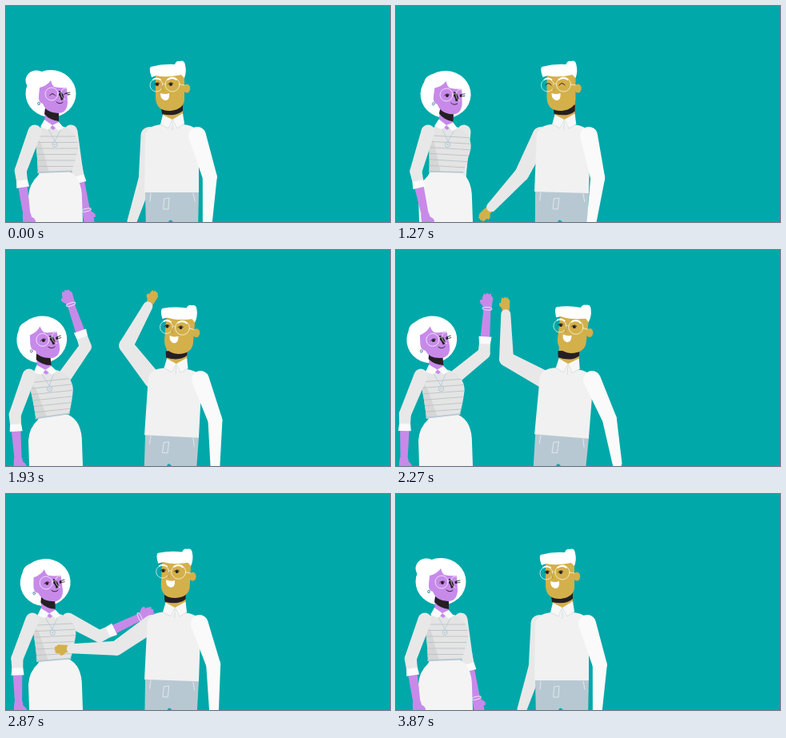
An HTML page with a canvas for the animation above (3.94 s loop, 480 by 270 pixels).

```html
<!DOCTYPE html>
<html>
<head>
<meta charset="utf-8">
<style>
html, body { margin: 0; width: 100%; height: 100%; overflow: hidden; background: #00a8a9; }
canvas { display: block; width: 480px; height: 270px; }
</style>
</head>
<body>
<canvas id="stage"></canvas>
<script>
const LOOP = 3940, STEP = 200 / 3;
const DARK = '#251f24', PURPLE = '#c78ae9', GOLD = '#d4b04a', BLUE = '#b8c8d2';
const CLOTH = '#f1f1f1', SHADE = '#e8e8e8', LENS = 'rgba(255,255,255,.75)';
const canvas = document.getElementById('stage');
const ratio = Math.max(1, window.devicePixelRatio || 1);
canvas.width = 480 * ratio;
canvas.height = 270 * ratio;
const ctx = canvas.getContext('2d');

// Pose: head x, head y, head tilt, lean, inner arm (upper, fore), outer arm (upper, fore)
const times = [0, 600, 1270, 1600, 1930, 2200, 2570, 3130, 3470, LOOP];
const womanRest = [0, 0, 0, 0, 81, 77, 110, 82];
const manRest = [0, 0, 0, 0, 95, 108, 73, 93];
const woman = [
  womanRest, womanRest,
  [5, 1, 2, 4, 95, 92, 107, 78],
  [-8, 1, -9, -7, -58, -112, 113, 87],
  [-7, 2, -8, -7, -55, -109, 110, 86],
  [-7, 2, -8, -5, -40, -86, 112, 91],
  [-7, 2, -8, -5, -37, -86, 113, 92],
  [-1.5, 0, -1, -1, 81, 44, 110, 84],
  womanRest, womanRest
];
const man = [
  manRest, manRest,
  [1.5, 0, 0, 2, 117, 133, 78, 98],
  [9, -2, 6, 4, 228, 300, 66, 84],
  [9, -1, 5, 4, 232, 299, 70, 90],
  [12, -2, 7, 6, 209, 270, 66, 80],
  [12, -2, 7, 6, 207, 267, 68, 83],
  manRest, manRest, manRest
];

// Monotone cubic interpolation between poses
function poseAt(poses, t) {
  let i = 0;
  while (i < times.length - 2 && t >= times[i + 1]) i++;
  const span = times[i + 1] - times[i], u = (t - times[i]) / span;
  return poses[0].map((_, c) => {
    const rate = k => k < 0 || k > times.length - 2 ? 0
      : (poses[k + 1][c] - poses[k][c]) / (times[k + 1] - times[k]);
    const slope = k => {
      const a = rate(k - 1), b = rate(k);
      return a * b > 0 ? 2 * a * b / (a + b) : 0;
    };
    const p = poses[i][c], q = poses[i + 1][c], v = 1 - u;
    return p * (1 + 2 * u) * v * v + q * (3 - 2 * u) * u * u
      + span * u * v * (slope(i) * v - slope(i + 1) * u);
  });
}

const rad = deg => deg * Math.PI / 180;
const polar = ([x, y], deg, len) => [x + len * Math.cos(rad(deg)), y + len * Math.sin(rad(deg))];

function fill(color, d) {
  ctx.fillStyle = color;
  ctx.fill(new Path2D(d));
}

function line(color, width, d) {
  ctx.strokeStyle = color;
  ctx.lineWidth = width;
  ctx.stroke(new Path2D(d));
}

function oval(x, y, rx, ry, color, width) {
  ctx.beginPath();
  ctx.ellipse(x, y, rx, ry, 0, 0, 7);
  if (width) {
    ctx.strokeStyle = color;
    ctx.lineWidth = width;
    ctx.stroke();
  } else {
    ctx.fillStyle = color;
    ctx.fill();
  }
}

function taper(color, a, ra, b, rb) {
  const dir = Math.atan2(b[1] - a[1], b[0] - a[0]);
  ctx.fillStyle = color;
  ctx.beginPath();
  ctx.arc(...a, ra, dir + Math.PI / 2, dir - Math.PI / 2);
  ctx.arc(...b, rb, dir - Math.PI / 2, dir + Math.PI / 2);
  ctx.fill();
}

function group(draw, setup) {
  ctx.save();
  setup();
  draw();
  ctx.restore();
}

const at = ([x, y], deg, draw) => group(draw, () => {
  ctx.translate(x, y);
  ctx.rotate(rad(deg));
});

const turned = (x, y, [dx, dy, tilt], draw) => group(draw, () => {
  ctx.translate(x + dx, y + dy);
  ctx.rotate(rad(tilt));
  ctx.translate(-x, -y);
});

function hand(color, size) {
  ctx.scale(size, size);
  fill(color, 'M-2 -5L5 -6Q12 -8 17 -6Q20 -5 17 -3Q21 -2 18 1Q20 4 16 4Q15 7 10 6Q4 6 -2 5Z');
  fill(color, 'M2 -4Q7 -12 11 -9Q11 -6 9 -3Z');
}

function womanArm(shoulder, upper, fore, len, bracelet) {
  const elbow = polar(shoulder, upper, len), wrist = polar(elbow, fore, 56);
  taper(PURPLE, elbow, 6.5, wrist, 4.5);
  at(wrist, fore, () => hand(PURPLE, 1));
  if (bracelet) at(wrist, fore, () => oval(0, 0, 1.8, 6, LENS, 1));
  taper(SHADE, shoulder, 8.5, elbow, 7.5);
  taper(SHADE, elbow, 7.5, polar(elbow, fore, 12), 7);
  at(elbow, fore, () => fill('#fafafa', 'M12 -7L21 -8L21 8L12 7Z'));
}

function manArm(color, shoulder, upper, fore) {
  const elbow = polar(shoulder, upper, 54), wrist = polar(elbow, fore, 61);
  at(wrist, fore, () => hand(GOLD, 0.85));
  taper(color, shoulder, 11, elbow, 9);
  taper(color, elbow, 9, polar(wrist, fore, -5), 6);
}

function eye(x, y, closed) {
  if (closed) line(DARK, 1, `M${x - 3.5} ${y + 1}Q${x} ${y - 4} ${x + 3.5} ${y + 1}`);
  else {
    oval(x, y, 2, 1.9, DARK);
    line(DARK, 0.8, `M${x - 3.5} ${y}Q${x} ${y - 4} ${x + 3} ${y - 1}`);
  }
}

function womanHair(tilt) {
  // The bun slips out of sight as the head turns
  const hide = Math.min(1, Math.abs(tilt) / 2) * 4;
  oval(56, 109.5, 31.5, 29.5, '#fff');
  oval(38 + hide, 93 + hide, 13.5, 12.5, '#fff');
}

function womanFace(closed) {
  fill(PURPLE, 'M42 102Q51 100 56 93Q57 98 60 101Q69 103 76 102L77 121Q76 134 65 134Q50 133 46 122Q40 121 41 112Z');
  fill(DARK, 'M66 106Q70 106 72 113Q73 117 69 118Q68 113 66 111Z');
  eye(58, 111, closed);
  if (closed) line(DARK, 1, 'M72 111Q75 107 78 111');
  else oval(75, 110.5, 1.5, 1.8, DARK);
  line(DARK, 0.8, 'M75 109L80 108M77 111L80 110.5');
  oval(57, 110, 8, 8, LENS, 0.9);
  line(LENS, 0.9, 'M65 109L68 108M76 103Q69 102 69 109Q69 115 74 117');
  line(DARK, 0.9, 'M63 120Q67 123.5 71 120.5');
  oval(41, 122, 1.3, 1.8, '#4f7f99', 0.9);
}

function womanTorso() {
  const torso = 'M37 157Q44 149 54 149L73 151Q91 160 90 177Q88 189 82 207L40 209Q39 182 36 165Z';
  fill('#e4e4e4', torso);
  group(() => {
    fill('#d6d6d6', 'M36 160L44 172L54 208L36 210Z');
    for (let y = 163; y < 204; y += 7.5) line('#b9bec2', 0.8, `M36 ${y}L92 ${y}`);
  }, () => ctx.clip(new Path2D(torso)));
  line(BLUE, 1.8, 'M40 208L82 206.5');
  fill(PURPLE, 'M49 126L64 126L66 149L59 155L48 147Z');
  fill(DARK, 'M49 128Q57 135 66 132L66 144Q55 143 48 135Z');
  fill('#fafafa', 'M48 142L43 151L53 155L58 149ZM66 145L58 149L66 156L72 152Z');
  line('#b4cad6', 0.8, 'M53 154L61 169L68 155');
  oval(61, 173, 3, 3.3, '#b4cad6', 1);
  oval(61, 173, 1, 1, '#b4cad6');
}

function drawWoman(p, closed) {
  const lean = p[3];
  womanArm([81 + lean, 157], p[4], p[5], 44, true);
  turned(57, 140, p, () => womanHair(p[2]));
  fill('#f4f4f4', 'M43 206L78 206Q95 214 95 241L96 270L29 270L28 238Q29 222 40 212Z');
  turned(61, 235, [0, 0, lean * 0.85], womanTorso);
  turned(57, 140, p, () => womanFace(closed));
  womanArm([36 + lean, 157], p[6], p[7], 52, false);
}

function manHead(closed) {
  oval(226, 103, 4.2, 5.5, GOLD);
  fill(GOLD, 'M187 86L223 84L223 117Q222 129 206 131Q188 132 187 115Z');
  fill('#fff', 'M182 89Q178 78 181 76Q196 72 211 73Q213 68 217 69Q223 67 224 74Q226 82 223 90L219 86Q200 90 188 87Z');
  line('#fff', 1.8, 'M184 92Q188 89 193 92M202 92Q208 88 213 92');
  eye(189, 98, closed);
  eye(206, 98, closed);
  oval(188, 99, 8, 8, LENS, 0.9);
  oval(208, 98, 9, 9, LENS, 0.9);
  line(LENS, 0.9, 'M196 98Q198 96 199 98M217 98L223 99');
  line('#a98a31', 0.8, 'M197 98Q193 104 197 106');
  fill('#fff', 'M193 109Q199 111 204 109Q205 118 199 118Q193 117 193 109Z');
}

function manBody() {
  fill(BLUE, 'M174 232L241 232L240 280L209 280L209 270Q205 265 203 270L203 280L175 280Z');
  line('#e3ebef', 0.9, 'M181 234L180 244M234 234L236 244M198 241L204 240L203 254L197 254Z');
  fill(CLOTH, 'M174 164Q174 150 194 148L222 148Q241 150 241 164L241 233L173 233Z');
  fill(GOLD, 'M195 122L221 120L221 138L209 144L196 139Z');
  fill(DARK, 'M194 127L221 123L221 131Q212 139 195 135Z');
  fill('#f7f7f7', 'M196 136L193 148L203 153L208 148L214 153L223 147L221 134L208 142Z');
  line('#d2d5d7', 0.7, 'M193 148L203 153L208 142L214 153L223 147M208 145L208 155');
}

function drawMan(p, closed) {
  const lean = p[3];
  manArm(SHADE, [179.5 + lean, 162], p[4], p[5]);
  turned(207, 233, [0, 0, lean * 0.75], manBody);
  turned(207, 138, p, () => manHead(closed));
  manArm('#fafafa', [239 + lean, 162], p[6], p[7]);
}

function frame(now) {
  const t = Math.floor((now % LOOP + 3.4) / STEP) * STEP;
  ctx.setTransform(ratio, 0, 0, ratio, 0, 0);
  ctx.lineCap = ctx.lineJoin = 'round';
  ctx.fillStyle = '#00a8a9';
  ctx.fillRect(0, 0, 480, 270);
  drawWoman(poseAt(woman, t), t < 130);
  drawMan(poseAt(man, t), t > 1120 && t < 1460);
  requestAnimationFrame(() => frame(performance.now() - start));
}

const start = performance.now();
frame(0);
</script>
</body>
</html>
```
